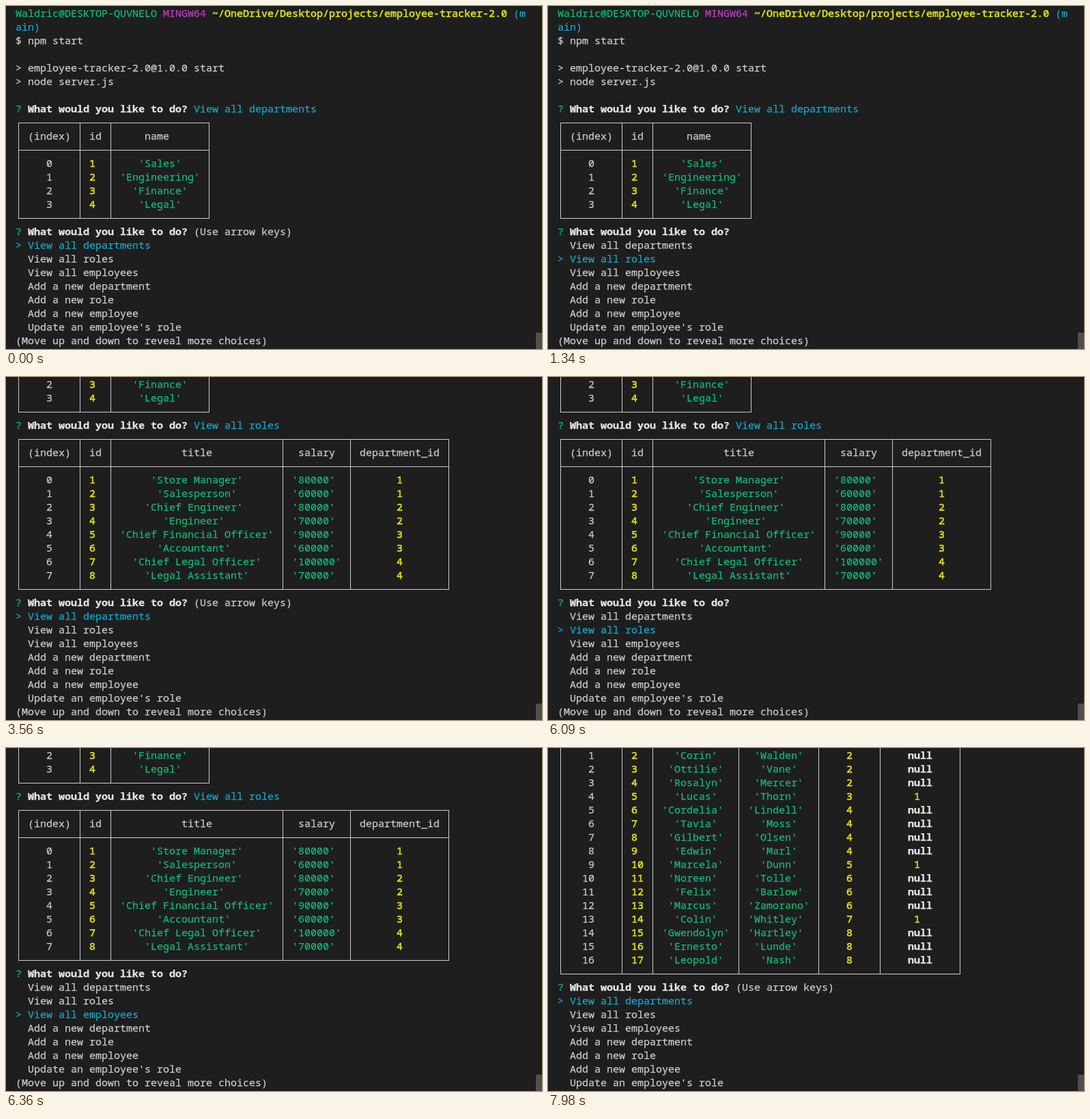
An HTML page for the animation above (8 s loop, 785 px wide and 503 px high).

```html
<!DOCTYPE html>
<html lang="en">
<head>
<meta charset="utf-8">
<title>Employee tracker terminal</title>
<style>
  html, body { margin: 0; width: 100%; height: 100%; overflow: hidden; background: #1e1e1e; }
  svg { display: block; width: 785px; height: 503px; }
  text {
    font: 15px "Noto Sans Mono", "DejaVu Sans Mono", monospace;
    white-space: pre;
    color: #ccc;
    fill: currentColor;
    stroke: currentColor;
    stroke-width: 0.25;
  }
  .green { color: #0dbc79; }
  .cyan { color: #11a8cd; }
  .magenta { color: #bc3fbc; }
  .yellow { color: #e5e510; stroke-width: 0.55; }
  .bold { color: #e5e5e5; font-weight: 700; }
  path { fill: none; stroke: #ccc; stroke-width: 1; shape-rendering: crispEdges; }
</style>
</head>
<body>
<svg id="stage" viewBox="0 0 785 503">
  <rect width="785" height="503" fill="#1e1e1e"/>
  <rect x="776" y="479" width="9" height="24" fill="#4f4f4f"/>
</svg>
<script>
const NS = "http://www.w3.org/2000/svg";
const stage = document.getElementById("stage");
const LEFT = 14, CHAR = 9, LINE = 20, BASE = 16;
const CHOICES = ["View all departments", "View all roles", "View all employees",
  "Add a new department", "Add a new role", "Add a new employee",
  "Update an employee's role"];

function add(parent, tag, attrs, text) {
  const el = document.createElementNS(NS, tag);
  for (const key in attrs) el.setAttribute(key, attrs[key]);
  if (text) el.textContent = text;
  return parent.appendChild(el);
}

function group(draw) {
  const g = add(stage, "g", { display: "none" });
  draw(g);
  return g;
}

function put(g, row, col, text, style = "") {
  add(g, "text", { x: LEFT + col * CHAR, y: BASE + row * LINE, class: style }, text);
}

function prompt(g, row, tail = "", style = "") {
  put(g, row, 0, "?", "green");
  put(g, row, 2, "What would you like to do?", "bold");
  if (tail) put(g, row, 29, tail, style);
}

function menu(g, row, selected, hint = "") {
  prompt(g, row, hint);
  CHOICES.forEach((choice, i) => {
    const on = i === selected;
    if (on) put(g, row + 1 + i, 0, ">", "cyan");
    put(g, row + 1 + i, 2, choice, on ? "cyan" : "");
  });
  put(g, row + 8, 0, "(Move up and down to reveal more choices)");
}

function styleOf(value, col) {
  if (col === 0) return "";
  if (value === null) return "bold";
  return typeof value === "number" ? "yellow" : "green";
}

// Centred cells; top is the row of the upper border, rows above 0 are scrolled off.
function table(g, top, widths, head, rows) {
  const edges = [0];
  widths.forEach(w => edges.push(edges[edges.length - 1] + w + 1));
  const lineX = col => LEFT + col * CHAR + 4.5;
  const lineY = row => row * LINE + 11.5;
  const end = top + 3 + rows.length;
  const right = lineX(edges[edges.length - 1]);

  let d = "";
  for (const row of [top, top + 2, end])
    if (row >= 0) d += `M${lineX(0) - 0.5} ${lineY(row)}H${right + 0.5}`;
  for (const col of edges)
    d += `M${lineX(col)} ${Math.max(0, lineY(top))}V${lineY(end)}`;
  add(g, "path", { d });

  const cell = (row, i, text, style) => {
    if (row < 0) return;
    put(g, row, edges[i] + 1 + Math.floor((widths[i] - text.length) / 2), text, style);
  };
  head.forEach((name, i) => cell(top + 1, i, name));
  rows.forEach((values, r) => [r, r + 1, ...values].forEach((v, i) => {
    const text = typeof v === "string" ? `'${v}'` : String(v);
    cell(top + 3 + r, i, text, styleOf(v, i));
  }));
}

const departments = ["Sales", "Engineering", "Finance", "Legal"].map(n => [n]);

const roles = [
  ["Store Manager", "80000"], ["Salesperson", "60000"],
  ["Chief Engineer", "80000"], ["Engineer", "70000"],
  ["Chief Financial Officer", "90000"], ["Accountant", "60000"],
  ["Chief Legal Officer", "100000"], ["Legal Assistant", "70000"]
].map(([title, pay], i) => [title, pay, 1 + (i >> 1)]);

const employees = [
  "Adele Quill 1", "Corin Walden 2", "Ottilie Vane 2", "Rosalyn Mercer 2",
  "Lucas Thorn 3", "Cordelia Lindell 4", "Tavia Moss 4", "Gilbert Olsen 4",
  "Edwin Marl 4", "Marcela Dunn 5", "Noreen Tolle 6", "Felix Barlow 6",
  "Marcus Zamorano 6", "Colin Whitley 7", "Gwendolyn Hartley 8",
  "Ernesto Lunde 8", "Leopold Nash 8"
].map(line => {
  const [first, last, role] = line.split(" ");
  return [first, last, +role, role % 2 ? 1 : null];
});

const departmentTable = (g, top) =>
  table(g, top, [9, 4, 15], ["(index)", "id", "name"], departments);

const intro = group(g => {
  put(g, 0, 0, "Waldric@DESKTOP-QUVNELO", "green");
  put(g, 0, 24, "MINGW64", "magenta");
  put(g, 0, 32, "~/OneDrive/Desktop/projects/employee-tracker-2.0", "yellow");
  put(g, 0, 81, "(m", "cyan");
  put(g, 1, 0, "ain)", "cyan");
  put(g, 2, 0, "$ npm start");
  put(g, 4, 0, "> employee-tracker-2.0@1.0.0 start");
  put(g, 5, 0, "> node server.js");
  prompt(g, 7, CHOICES[0], "cyan");
  departmentTable(g, 8);
});

const roleView = group(g => {
  departmentTable(g, -5);
  prompt(g, 3, CHOICES[1], "cyan");
  table(g, 4, [9, 4, 27, 10, 15],
    ["(index)", "id", "title", "salary", "department_id"], roles);
});

const staffView = group(g => {
  table(g, -4, [9, 4, 13, 12, 9, 12],
    ["(index)", "id", "first_name", "last_name", "role_id", "manager_id"], employees);
  menu(g, 17, 0, "(Use arrow keys)");
});

const fresh = group(g => menu(g, 16, 0, "(Use arrow keys)"));
const second = group(g => menu(g, 16, 1));
const third = group(g => menu(g, 16, 2));

const LOOP = 8000;
const steps = [
  [0, intro, fresh],
  [1340, intro, second],
  [3560, roleView, fresh],
  [6060, roleView],
  [6090, roleView, second],
  [6330, roleView],
  [6360, roleView, third],
  [7980, staffView]
];
const layers = [intro, roleView, staffView, fresh, second, third];
let current = null;

function show(time) {
  const step = steps.filter(s => s[0] <= time).pop();
  if (step === current) return;
  current = step;
  for (const layer of layers)
    layer.setAttribute("display", step.includes(layer) ? "inline" : "none");
}

const start = performance.now();
function tick() {
  show((performance.now() - start) % LOOP);
  requestAnimationFrame(tick);
}
tick();
</script>
</body>
</html>
```
